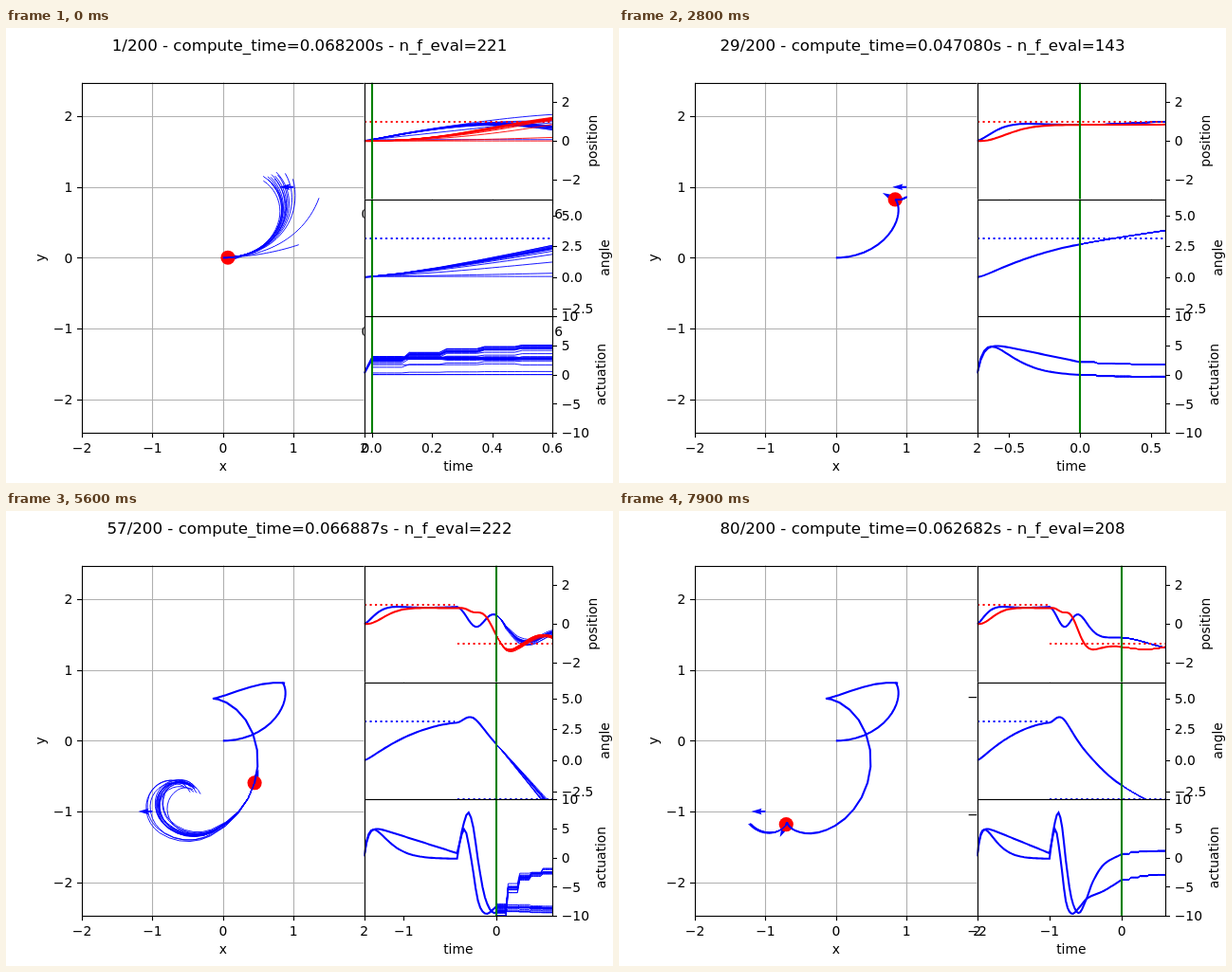
Write an HTML page with a canvas that moves like this. It is 640 px wide and 480 px high and loops after 8 s.

```html
<!DOCTYPE html>
<html>
<head>
<meta charset="utf-8">
<style>
html, body { margin: 0; width: 100%; height: 100%; overflow: hidden; background: #fff; }
canvas, svg { position: absolute; left: 0; top: 0; width: 640px; height: 480px; }
text { font: 13.89px "DejaVu Sans", sans-serif; }
#title { font-size: 16.67px; }
</style>
</head>
<body>
<canvas id="c" width="640" height="480"></canvas>
<svg id="s" viewBox="0 0 640 480"><text id="title" x="320" y="24" text-anchor="middle"></text></svg>
<script>
const ctx = document.getElementById('c').getContext('2d');
const svg = document.getElementById('s');
const title = document.getElementById('title');
const DT = 0.025, HORIZON = 24, FRAMES = 80, POP = 16, SWITCH = 40;
const L = 80, MID = 377.6, R = 576, TOP = 57.6, ROW = 123.2, BOT = 427.2;
const X = x => 228.8 + 74.4 * x, Y = y => 242.4 - 74.6 * y;
const panels = [
  { lo: -3, hi: 3, ticks: ['2', '0', '−2'], name: 'position', lx: 622.5 },
  { lo: -Math.PI, hi: 2 * Math.PI, ticks: ['5.0', '2.5', '0.0', '−2.5'], name: 'angle', lx: 636 },
  { lo: -10, hi: 10, ticks: ['10', '5', '0', '−5', '−10'], name: 'actuation', lx: 631.5 }
];
panels.forEach((p, i) => {
  p.top = TOP + ROW * i;
  p.y = v => p.top + ROW * (p.hi - v) / (p.hi - p.lo);
});
const num = s => +s.replace('−', '-');
const snap = v => Math.floor(v + 0.5) + 0.5;
const lerp = (a, b, k) => a + (b - a) * k;
function rnd(a, b, c) {
  const s = Math.sin(a * 12.9898 + b * 78.233 + c * 37.719) * 43758.5453;
  return s - Math.floor(s);
}
// Index of the span of rows (keyed by their first entry) that holds t
function spanAt(rows, t) {
  let i = 0;
  while (i < rows.length - 2 && t > rows[i + 1][0] + 1e-6) i++;
  return i;
}
function mix(rows, t) {
  const i = spanAt(rows, t), a = rows[i], b = rows[i + 1], k = (t - a[0]) / (b[0] - a[0]);
  return a.map((v, j) => lerp(v, b[j], k));
}
// Smooth curve through [t, value] points
function spline(p) {
  const slope = i => {
    const a = p[Math.max(i - 1, 0)], b = p[Math.min(i + 1, p.length - 1)];
    return (b[1] - a[1]) / (b[0] - a[0]);
  };
  return t => {
    const i = spanAt(p, t), [x0, y0] = p[i], [x1, y1] = p[i + 1];
    const h = x1 - x0, k = (t - x0) / h, k2 = k * k, k3 = k2 * k;
    return y0 * (2 * k3 - 3 * k2 + 1) + y1 * (3 * k2 - 2 * k3) +
      h * (slope(i) * (k3 - 2 * k2 + k) + slope(i + 1) * (k3 - k2));
  };
}

// Forward speed and turn rate: an approach to the first goal, then a swing to the second
const speedIn = t => 69.8 * t ** 0.8 * Math.exp(-7.9 * t) - 0.22;
const turnIn = t => (5.8 - 5.05 * t) * (1 - Math.exp(-t / 0.043));
const speedOut = spline([[0, -.2], [.05, 4.4], [.12, 7.7], [.176, 5.1], [.225, -.4], [.3, -6.8], [.4, -9.5], [.5, -7.4], [.6, -4.1], [.75, -1.2], [1, .6]]);
const turnOut = spline([[0, .75], [.08, 4.85], [.15, 0], [.225, -7.4], [.305, -9.6], [.4, -8.7], [.52, -7], [.75, -5.7], [1, -3.8]]);
const control = i => {
  const t = i * DT;
  return i > SWITCH ? [speedOut(t - 1), turnOut(t - 1)] : [speedIn(t), turnIn(t)];
};

function advance(s, v, w) {
  const mid = s.a + w * DT / 2;
  return { x: s.x + v * DT * Math.cos(mid), y: s.y + v * DT * Math.sin(mid), a: s.a + w * DT, v, w };
}
const past = [{ x: 0, y: 0, a: 0, v: 0.2, w: 0.2 }];
for (let i = 1; i <= FRAMES; i++) past.push(advance(past[i - 1], ...control(i)));

// Planned controls ease from the current ones to these: time, spread, speed, turn rate
const plans = [
  [0, .1, 3.2, 5.3], [.15, .1, .2, 3.4], [.525, .05, -.5, 2.4], [1, .01, -.2, .6],
  [1.025, .4, 3, -1], [1.225, .16, -5.8, -7.2], [1.425, .14, -2.3, -8.7],
  [1.75, .07, 1.1, -5], [2, .03, 1.15, -2.8]
];

function predict(n) {
  const now = past[n], [, spread, vEnd, wEnd] = mix(plans, n * DT);
  const wild = Math.max(0, 1 - (n - 1) / 6), out = [];
  for (let m = 0; m < POP; m++) {
    const off = c => (2 * rnd(n, m, c) - 1) ** 5 * spread;
    const lag = 1 / (1 + (m / 2) ** 3);
    const fv = (1 - wild * lag ** 8) * (1 + off(1)), fw = (1 - wild * lag) * (1 + off(2));
    const line = [];
    let s = now;
    for (let q = 0; q <= HORIZON; q++) {
      const j = Math.floor(q / 5);
      const v = fv * (lerp(vEnd, now.v, 0.4 ** j) + 4 * off(10 + j));
      const w = fw * (lerp(wEnd, now.w, 0.6 ** j) + 2 * off(20 + j));
      s = q ? advance(s, v, w) : { ...s, v, w };
      line.push(s);
    }
    out.push(line);
  }
  return out;
}

function poly(pts, color, width, dash) {
  ctx.strokeStyle = color;
  ctx.lineWidth = width;
  ctx.setLineDash(dash || []);
  ctx.beginPath();
  pts.forEach(p => ctx.lineTo(p[0], p[1]));
  ctx.stroke();
  ctx.setLineDash([]);
}
const hline = (x0, x1, y, color) => poly([[x0, snap(y)], [x1, snap(y)]], color, 1.11);
const vline = (x, y0, y1, color) => poly([[snap(x), y0], [snap(x), y1]], color, 1.11);
const frame = (x0, y0, x1, y1) => {
  ctx.strokeStyle = '#000';
  ctx.lineWidth = 1.11;
  ctx.strokeRect(snap(x0), snap(y0), snap(x1) - snap(x0), snap(y1) - snap(y0));
};
function clipped(x, y, w, h, draw) {
  ctx.save();
  ctx.beginPath();
  ctx.rect(x, y, w, h);
  ctx.clip();
  draw();
  ctx.restore();
}
function arrow(x, y, a) {
  ctx.save();
  ctx.translate(X(x), Y(y));
  ctx.rotate(-a);
  ctx.fillStyle = '#00f';
  ctx.beginPath();
  [[0, -1.1], [5, -1.1], [3.9, -3.3], [15, 0], [3.9, 3.3], [5, 1.1], [0, 1.1]].forEach(p => ctx.lineTo(...p));
  ctx.fill();
  ctx.restore();
}

function drawMap(n, lines) {
  for (let v = -2; v <= 2; v++) {
    vline(X(v), TOP, BOT, '#b0b0b0');
    hline(L, MID, Y(v), '#b0b0b0');
    vline(X(v), BOT, BOT + 5, '#000');
    hline(L - 5, L, Y(v), '#000');
  }
  const bot = past[n], goal = n > SWITCH ? -1 : 1;
  clipped(L, TOP, MID - L, BOT - TOP, () => {
    arrow(goal, goal, Math.PI);
    arrow(bot.x, bot.y, bot.a);
    ctx.fillStyle = '#f00';
    ctx.beginPath();
    ctx.arc(X(bot.x), Y(bot.y), 7.6, 0, 7);
    ctx.fill();
    const xy = s => [X(s.x), Y(s.y)];
    poly(past.slice(0, n + 1).map(xy), '#00f', 2.08);
    lines.forEach(l => poly(l.map(xy), '#00f', .9));
  });
  frame(L, TOP, MID, BOT);
}

function timeTicks(t) {
  const step = [.2, .25, .5, 1].find(s => s >= (t + .6) / 4 - 1e-9);
  const digits = step === 1 ? 0 : step === .25 ? 2 : 1, out = [];
  for (let k = Math.ceil(-t / step - 1e-6); k * step <= .6 + 1e-6; k++)
    out.push([k * step, (k < 0 ? '−' : '') + Math.abs(k * step).toFixed(digits)]);
  return out;
}

function drawCharts(n, lines) {
  const t = n * DT, sx = s => MID + (R - MID) * s / (t + .6);
  const ticks = timeTicks(t), hist = past.slice(0, n + 1);
  const keys = [[['x', '#00f'], ['y', '#f00']], [['a', '#00f']], [['v', '#00f'], ['w', '#00f']]];
  const goals = n > SWITCH ? [[0, .975, 1], [1, t + .6, -1]] : [[0, t + .6, 1]];
  panels.forEach((p, i) => {
    const end = p.top + ROW;
    ctx.fillStyle = '#fff';
    ctx.fillRect(MID, p.top, R - MID, ROW);
    clipped(MID, p.top, R - MID, ROW, () => {
      keys[i].forEach(([k, color]) => {
        lines.forEach(l => poly(l.map((s, q) => [sx(t + q * DT), p.y(s[k])]), color, .9));
        poly(hist.map((s, q) => [sx(q * DT), p.y(s[k])]), color, 2.08);
      });
      if (i < 2) goals.forEach(([a, b, g]) => {
        const y = Math.round(p.y(i ? g * Math.PI : g));
        poly([[Math.round(sx(a)), y], [sx(b), y]], i ? '#00f' : '#f00', 2.08, [2.08, 3.44]);
      });
      const now = Math.round(sx(t));
      poly([[now, p.top], [now, end]], '#008000', 2.08);
    });
    frame(MID, p.top, R, end);
    p.ticks.forEach(s => hline(R, R + 5, p.y(num(s)), '#000'));
    ctx.fillStyle = '#000';
    ctx.font = '13.89px "DejaVu Sans", sans-serif';
    ctx.textAlign = 'center';
    ticks.forEach(([v, s]) => {
      vline(sx(t + v), end, end + 5, '#000');
      ctx.fillText(s, sx(t + v), Math.round(end + 20.6));
    });
  });
}

function label(str, x, y, anchor, turned) {
  const e = document.createElementNS('http://www.w3.org/2000/svg', 'text');
  e.textContent = str;
  e.setAttribute('text-anchor', anchor);
  e.setAttribute('transform', `translate(${x} ${y})` + (turned ? ' rotate(-90)' : ''));
  svg.appendChild(e);
}
['−2', '−1', '0', '1', '2'].forEach(s => {
  label(s, X(num(s)), 448, 'middle');
  label(s, 70.3, Math.round(Y(num(s)) + 5.2), 'end');
});
label('x', 228.8, 467, 'middle');
label('time', 476.8, 467, 'middle');
label('y', 41.4, 242.4, 'middle', true);
panels.forEach(p => {
  p.ticks.forEach(s => label(s, 585.7, Math.round(p.y(num(s)) + 5.2), 'start'));
  label(p.name, p.lx, p.top + ROW / 2, 'middle', true);
});

// Step, compute time, evaluations
const stats = [
  [1, .0682, 221], [21, .052473, 156], [37, .041687, 130], [49, .063005, 209],
  [57, .066887, 222], [70, .067722, 209], [80, .062682, 208]
];

let shown = 0;
function draw(n) {
  const lines = predict(n), [, cost, evals] = mix(stats, n);
  title.textContent = `${n}/200 - compute_time=${cost.toFixed(6)}s - n_f_eval=${Math.round(evals)}`;
  ctx.fillStyle = '#fff';
  ctx.fillRect(0, 0, 640, 480);
  drawMap(n, lines);
  drawCharts(n, lines);
}
const start = performance.now();
function tick() {
  const n = Math.floor((performance.now() - start) % 8000 / 100) + 1;
  if (n !== shown) draw(shown = n);
  requestAnimationFrame(tick);
}
tick();
</script>
</body>
</html>
```
